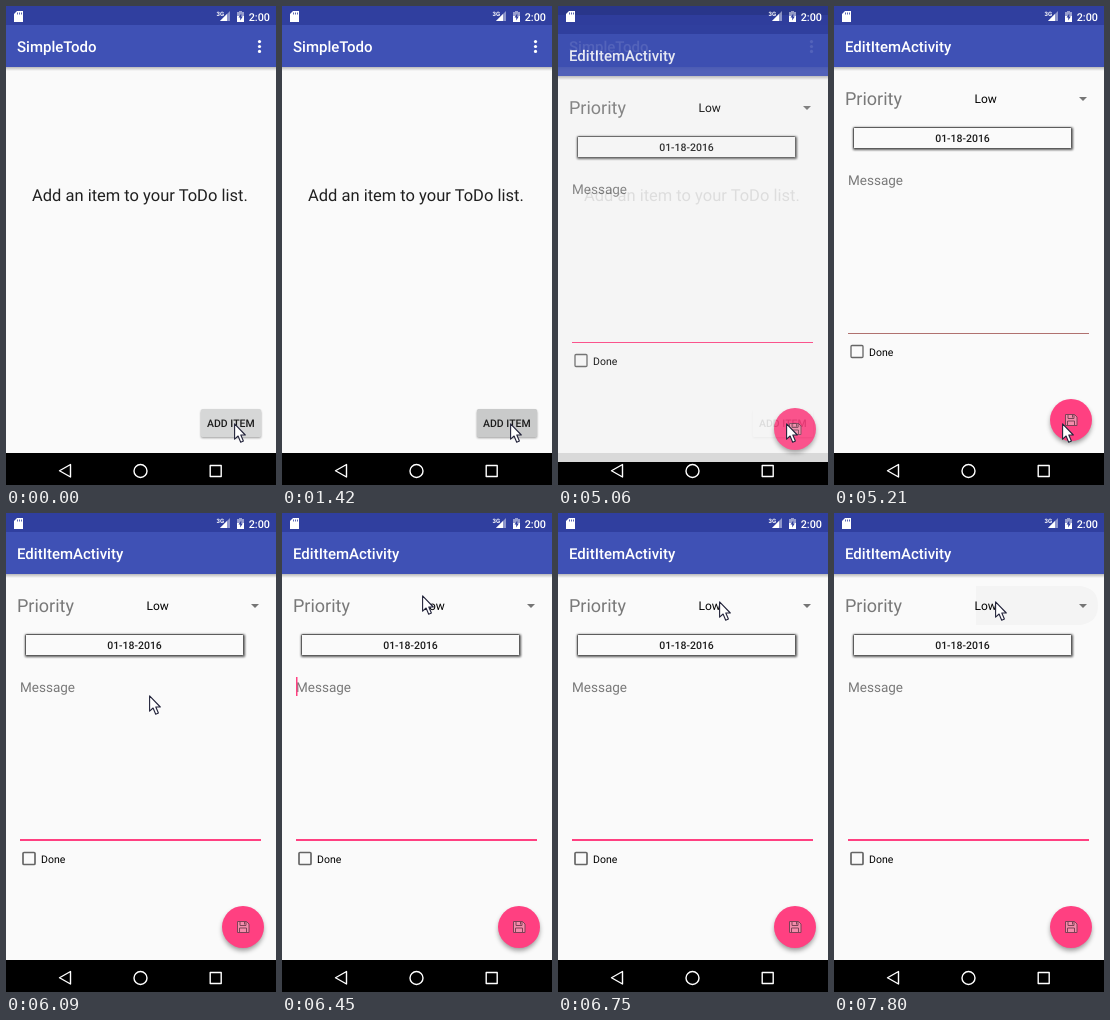
An HTML page for the animation above (8 s loop, 270 by 479 pixels).

```html
<!DOCTYPE html>
<html lang="en">
<head>
<meta charset="utf-8">
<title>Todo app</title>
<style>
html, body { margin: 0; width: 100%; height: 100%; overflow: hidden; background: #000; }
svg { display: block; width: 100%; height: 100%; }
text { font-family: Roboto, "Noto Sans", sans-serif; text-rendering: geometricPrecision; white-space: pre; }
.title { font-size: 15px; font-weight: 500; fill: #fff; }
.label { font-size: 10.5px; font-weight: 500; fill: #1c1c1c; }
.hint { fill: #797979; }
.nav { fill: none; stroke: #fff; stroke-width: 1.4; stroke-linejoin: round; }
</style>
</head>
<body>
<svg viewBox="0 0 270 479" preserveAspectRatio="none">
  <defs>
    <linearGradient id="shade" x2="0" y2="1">
      <stop offset="0" stop-color="#000" stop-opacity=".26"/>
      <stop offset="1" stop-color="#000" stop-opacity="0"/>
    </linearGradient>
    <filter id="soft" x="-30%" y="-60%" width="160%" height="220%">
      <feGaussianBlur stdDeviation="1.3"/>
    </filter>
    <filter id="wide" x="-30%" y="-30%" width="160%" height="160%">
      <feGaussianBlur stdDeviation="2.4"/>
    </filter>
    <g id="frame">
      <rect width="270" height="447" fill="#fafafa"/>
      <rect width="270" height="19" fill="#303f9f"/>
      <rect y="19" width="270" height="42" fill="#3f51b5"/>
      <rect y="61" width="270" height="4" fill="url(#shade)"/>
    </g>
  </defs>

  <rect width="270" height="479"/>

  <g id="list">
    <use href="#frame"/>
    <text class="title" x="11" y="46">SimpleTodo</text>
    <g fill="#fff">
      <circle cx="253.5" cy="35.6" r="1.6"/>
      <circle cx="253.5" cy="40.5" r="1.6"/>
      <circle cx="253.5" cy="45.4" r="1.6"/>
    </g>
    <text x="26" y="195" font-size="16.5" fill="#202020">Add an item to your ToDo list.</text>
    <rect x="195" y="404.5" width="60" height="27.5" rx="1.5" opacity=".38" filter="url(#soft)"/>
    <rect id="add" x="195" y="403" width="60" height="28" rx="1.5"/>
    <text class="label" x="201" y="421">ADD ITEM</text>
  </g>

  <g id="edit">
    <use href="#frame"/>
    <text class="title" x="11" y="46">EditItemActivity</text>
    <path id="ripple" d="M142 73H246Q264 75 264 92.5T246 112H142Z" fill="#f4f4f4"/>
    <text class="hint" x="11" y="99" font-size="18">Priority</text>
    <text x="140.5" y="97" font-size="12">Low</text>
    <path d="M245 91h8l-4 4z" fill="#757575"/>

    <rect x="19" y="121.5" width="220" height="22.5" rx="1" opacity=".65" filter="url(#soft)"/>
    <rect x="19.5" y="121.5" width="218" height="21" rx="1" fill="#fafafa" stroke="#5c5c5c"/>
    <text class="label" x="128.5" y="136" text-anchor="middle">01-18-2016</text>

    <text class="hint" x="14" y="179" font-size="13.5">Message</text>
    <rect id="caret" x="14" y="164" width="1.5" height="19" fill="#ff4081"/>
    <rect id="line" x="14" width="241"/>

    <rect id="box" x="17" y="339.5" width="12" height="12" rx="1" fill="none" stroke="#666"/>
    <text x="35" y="349.5" font-size="10.5">Done</text>

    <circle cx="237" cy="417" r="20.5" opacity=".4" filter="url(#wide)"/>
    <circle cx="237" cy="414" r="21" fill="#ff4081"/>
    <g fill="none" stroke="#7d4257">
      <path d="M231.5 408.5h9l2.500 2.500v8.500h-11.500z" fill="#f58bab"/>
      <path d="M234 408.500v4h6v-4M233.500 419.500v-4.500h7v4.500M238.500 409v2.500"/>
    </g>
  </g>

  <g fill="#fff">
    <path d="M11 5h6v11H8V8z"/>
    <path d="M11.500 6.500v2M13.500 6.500v2M15.500 6.500v2" stroke="#303f9f" stroke-width=".8"/>
    <text x="210.500" y="9.500" font-size="6" font-weight="700">3G</text>
    <path d="M224 5v10h-10z" opacity=".45"/>
    <path d="M221 8v7h-7z"/>
    <path d="M233 6v-1h3v1h2v10h-7V6z" opacity=".5"/>
    <path d="M231 10h7v6h-7z"/>
    <path d="M235.300 7.500l-2.800 4h1.700v3l2.600-4h-1.500z" fill="#303f9f"/>
    <text x="264" y="14.500" font-size="10.800" font-weight="500" text-anchor="end">2:00</text>
  </g>

  <g class="nav">
    <path d="M64.500 458.500v12.500l-11-6.250z"/>
    <circle cx="134.500" cy="465" r="6.500"/>
    <rect x="204.200" y="459.500" width="11" height="11"/>
  </g>

  <path id="pointer" d="M.6.8V16.200L4.100 13 6.700 19.200 9.400 18 6.800 12H11.300Z" fill="#fff" stroke="#22233a" stroke-width="1.100" stroke-linejoin="round"/>
</svg>

<script>
const LOOP = 8000;
const PRESS = 1420, ENTER = 5060, SHOW = 5210, FOCUS = 5360, RIPPLE = 7800;

// time, x, y of the pointer tip
const pointerSteps = [
  [0, 228, 417], [5820, 224, 413], [5940, 214, 402], [6090, 143, 182],
  [6210, 142, 152], [6330, 141, 112], [6450, 140, 82], [6600, 156, 87], [6750, 161, 88]
];
const caretOn = [[5510, 5940], [6450, 6750]];

const el = id => document.getElementById(id);
const set = (id, attrs) => {
  for (const name in attrs) el(id).setAttribute(name, attrs[name]);
};
const show = (id, on) => set(id, { visibility: on ? "inherit" : "hidden" });

function draw(t) {
  const entering = t >= ENTER && t < SHOW;
  const focused = t >= FOCUS;
  const alpha = entering ? 0.87 : 1;

  show("list", t < SHOW);
  show("edit", t >= ENTER);
  set("list", { opacity: alpha });
  set("edit", { opacity: alpha, transform: `translate(0 ${entering ? 9 : 0})` });

  set("add", { fill: t < PRESS ? "#d6d7d7" : "#c9caca" });
  if (entering) set("add", { fill: "#fafafa" });

  set("line", {
    y: focused ? 326 : 327,
    height: focused ? 2 : 1,
    fill: focused || entering ? "#ff4081" : "#b0716f"
  });
  set("box", { "stroke-width": focused ? 1.7 : 1.3 });
  show("caret", t >= ENTER && caretOn.some(([from, to]) => t >= from && t < to));
  show("ripple", t >= RIPPLE);

  const [, x, y] = pointerSteps.filter(step => step[0] <= t).pop();
  set("pointer", { transform: `translate(${x} ${y})` });
}

const start = performance.now();
function tick() {
  draw((performance.now() - start) % LOOP);
  requestAnimationFrame(tick);
}
tick();
</script>
</body>
</html>
```
